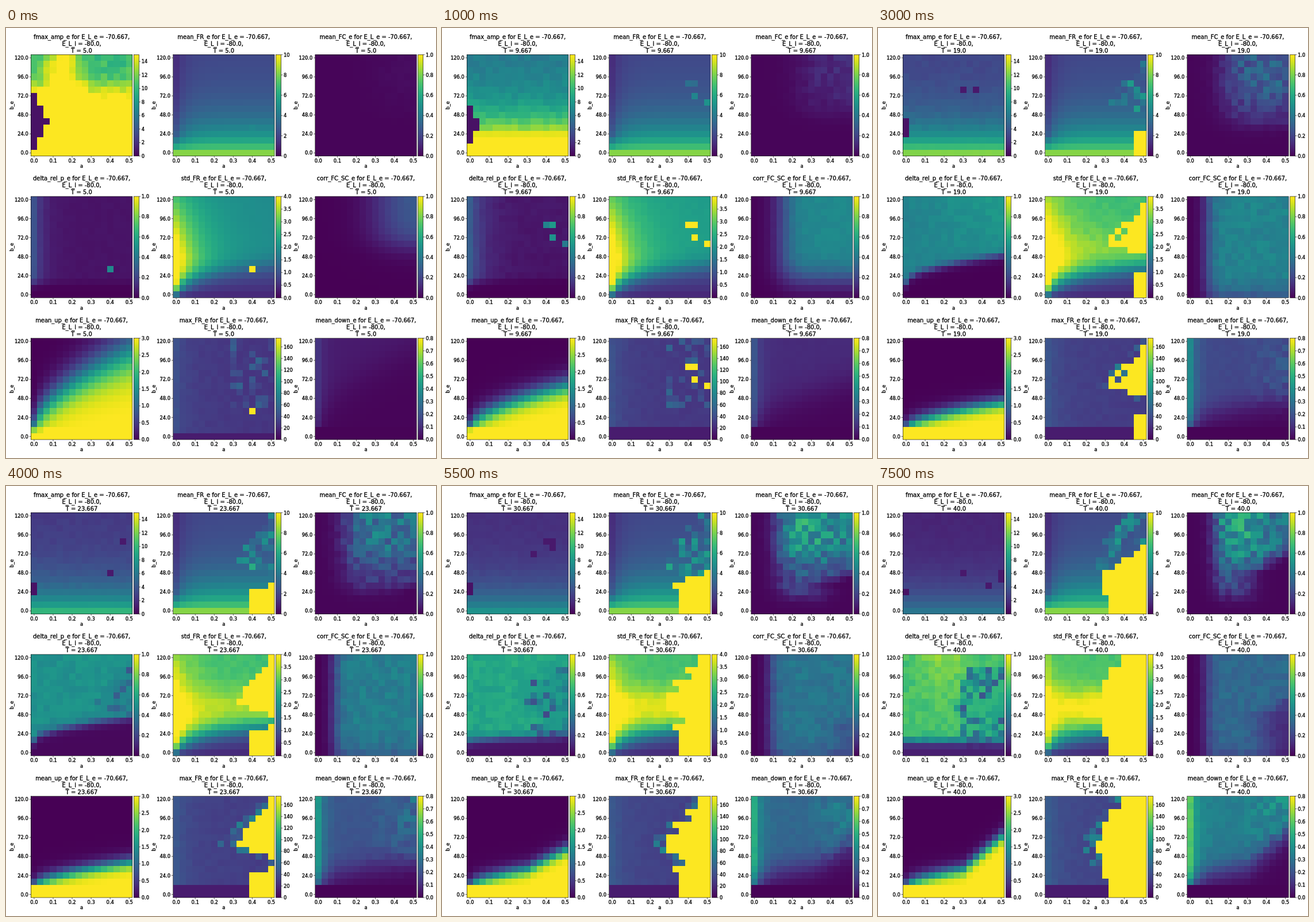
Write an HTML page that moves like this. It is 748 by 748 pixels and loops after 8000 ms.

```html
<!DOCTYPE html>
<html lang="en">
<head>
<meta charset="utf-8">
<title>Parameter sweep</title>
<style>
html, body { margin: 0; width: 100%; height: 100%; overflow: hidden; background: #fff; }
svg { display: block; width: 100vw; height: 100vh; }
text { font-family: "DejaVu Sans", Verdana, sans-serif; font-size: 8.3px; stroke: #000; stroke-width: .34px; }
.title { font-size: 9.95px; }
.cells { shape-rendering: crispEdges; }
.line { fill: none; stroke: #000; stroke-width: .6; }
</style>
</head>
<body>
<svg id="stage" viewBox="0 0 748 748"></svg>
<script>
const N = 16, STEPS = 16, STEP_MS = 500, SIZE = 176.4, CELL = SIZE / N;
const stage = document.getElementById("stage");
let step = 0;

const clamp = (v, lo, hi) => Math.min(hi, Math.max(lo, v));
const sig = x => 1 / (1 + Math.exp(-x));
const decay = (x, len) => Math.exp(-x / len);
const bell = x => Math.exp(-x * x);

// Linear change from a to b between two steps, held outside them
const go = (a, b, from = 0, to = STEPS - 1) => a + (b - a) * clamp((step - from) / (to - from), 0, 1);

const temp = () => 5 + step * 7 / 3;

function rnd(i, j, seed) {
  const s = Math.sin(i * 12.9898 + j * 78.233 + seed * 37.719) * 43758.5453;
  return s - Math.floor(s);
}

// First column of a row where the mean rate saturates
function meanEdge(j) {
  if (j < go(4, 3, 13, 15)) return Math.round(go(go(20, 11, 0, 9), 10, 13, 15));
  const rise = Math.max(0, j - go(go(3, 3.7, 6, 9), 6, 9, 15));
  return Math.ceil(go(go(20, 10.5, 0, 9), 9, 9, 13) + rise * go(8, 1.5, 6, 13));
}

// First column of a row where the peak rate saturates: a wedge pointing left
function peakEdge(j) {
  const tip = go(16, 9.5, 4, 6) - go(0, 2.5, 6, 15);
  const slope = j > 8 ? go(.95, .7, 6, 15) : go(3, .9, 6, 12);
  return Math.min(meanEdge(j), tip + slope * Math.abs(j - 8));
}

// Early isolated bursts, later everything inside the ragged wedge
function burst(i, j) {
  const r = rnd(i, j, step + 5);
  if (step < 5 && i > 11 && Math.abs(j - go(6, 11, 0, 4)) < 3 && r > go(.92, .75, 0, 4)) return true;
  return i >= meanEdge(j) || i + (j > 4 ? (r - .5) * 1.6 : 0) >= peakEdge(j);
}

// Row where the up state ends, for a column
const upEdge = i => 1.3 + (3.6 + 8.3 * decay(step, 2)) * (i / 15) ** .6
  + go(0, 4.2, 9, 13) * Math.max(0, i - 9) / 6;

function peakFreq(i, j, n) {
  const fade = decay(step, 4);
  if (Math.abs(j - 3.2 - 1.8 * fade) < .5 + 4.3 * fade - 2.2 * i) return .7;
  if (step > 3 && i > 8 && j > 3 && j < 12 && n > .94) return 1;
  const v = (56 + 176 * decay(j, 4) + (n - .5) * (j > 3 ? 9 : 2)) / temp();
  return v + go(1, 0, 0, 1) * (5 * bell((i - 4.5) / 3) - 2 * sig((j - 10.5) * 2));
}

function meanRate(i, j, n) {
  const edge = meanEdge(j);
  if (i >= edge) return 10;
  const v = (2 + 6.2 * decay(j, 4.3)) * (1 - .42 * decay(i, 1.6) * Math.min(1, j / 3));
  return v + (burst(i, j) ? n * n * 3 : 0);
}

function meanFC(i, j, n) {
  const rows = .4 * sig((j - go(6, 2.5, 3, 10)) / .6) + .6 * sig((j - go(8.5, 7.5)) / 1.2);
  const cols = sig((i - go(9, 4, 0, 9)) / go(1.5, .6)) * (1 - go(0, .3, 6, 13) * Math.max(0, i - 9) / 6);
  return .01 + go(.02, .52, 0, 11) * rows * cols * (.65 + .7 * n) * sig((meanEdge(j) - i + .5) / .8);
}

function deltaP(i, j, n) {
  if (step < 5 && burst(i, j)) return .4 + n * .15;
  const above = sig((j - 1.8 - 4.5 * bell((step - 6.5) / 3.5) * Math.sqrt(i / 15)) / .35);
  let v = go(.05, .44, 3.5, 6) + go(0, .18, 6, 15)
    + go(.2, .28, 0, 4) * go(1, 0, 4, 6) * decay(i, go(1.4, 3, 0, 4))
    + .13 * bell((step - 5) / 2) * i * j / 225
    + go(0, .13, 10, 15) * (j / 15) ** 2 * bell((i - 6) / 4)
    + (n - .5) * go(.01, .09, 0, 12);
  if (step > 6 && j < 14 && burst(i, j)) v -= n * n * go(.2, .5, 6, 13);
  return go(0, .08, 6, 15) + v * above;
}

function stdRate(i, j, n) {
  if (burst(i, j)) return 4;
  const low = .45 + .1 * j + decay(i, 1.2) * Math.min(1, j);
  const high = go(1.9, 2.75, 0, 6) + go(0, .1, 6, 15)
    + go(0, 1.1, 3, 13) * bell((j - 7) / 3.2) * (.8 + .05 * i)
    + go(2.6, 1) * decay(i, go(4, 1.3, 4, 15)) * (1 - Math.max(0, j - 6) * .07)
    + (n - .5) * go(.02, .18, 0, 6);
  return low + (high - low) * sig((j - .9 - go(4, 2.8) * Math.sqrt(i / 15)) / .85);
}

function corrFC(i, j, n) {
  const v = (go(.3, .47, 0, 2) - go(0, .13, 4, 15))
    * sig((i - 2.6 - 7.4 * decay(step, 1.5)) / (.6 + 1.4 * decay(step, 2)))
    * sig((j + 1.5 - 9.5 * decay(step, 2.4)) / 1.2);
  const shade = go(0, .65, 9, 13) * sig((i - meanEdge(j) - 2.3) / 1.1);
  return v * (1 + (n - .5) * go(.03, .22, 0, 8)) * (1 - shade);
}

function meanUp(i, j) {
  if (j === 0) return 3;
  const width = (.6 + .8 * decay(step, 2)) * (1 + i / 15 * .7 * decay(step, 1));
  const v = 3.05 * sig((upEdge(i) - j) / width);
  return j === 1 ? Math.max(v, 2.5 + .3 * i + .15 * step) : v;
}

function maxRate(i, j, n) {
  if (burst(i, j)) return 175;
  if (j < Math.min(2, step + 1)) return 13;
  let v = go(29, 37) - i * .15 + 13 * decay(i, 2) + (n - .5) * 4;
  if (j > 4 && step > 5 && i >= peakEdge(j) - 2) v += n * n * 45;
  if (step < 5 && i > 8 && j > 4) v += n ** 4 * 30;
  return v;
}

function meanDown(i, j, n) {
  if (j < 2) return .005;
  const above = sig((j - upEdge(i) - Math.min(1, i / 3) * .8) / go(1.8, 1.2, 0, 4));
  const v = go(.05, .33) + (go(.06, .2, 0, 5) + go(0, .05, 5, 15)) * decay(i, 1)
    + Math.max(0, i - 8) / 7 * n * go(0, .15, 2, 9) + (n - .5) * go(0, .04);
  return .008 + v * above;
}

const panels = [
  { name: "fmax_amp_e", max: 15, tick: 2, dec: 0, value: peakFreq },
  { name: "mean_FR_e", max: 10, tick: 2, dec: 0, value: meanRate },
  { name: "mean_FC_e", max: 1, tick: .2, dec: 1, value: meanFC },
  { name: "delta_rel_p_e", max: 1, tick: .2, dec: 1, value: deltaP },
  { name: "std_FR_e", max: 4, tick: .5, dec: 1, value: stdRate },
  { name: "corr_FC_SC_e", max: 1, tick: .2, dec: 1, value: corrFC },
  { name: "mean_up_e", max: 3, tick: .5, dec: 1, value: meanUp },
  { name: "max_FR_e", max: 175, tick: 20, dec: 0, value: maxRate },
  { name: "mean_down_e", max: .8, tick: .1, dec: 1, value: meanDown }
];

// Polynomial fit of the dark violet to yellow ramp, one row per channel
const ramp = [
  [.27773, .10509, -.33086, -4.63423, 6.22827, 4.77638, -5.43546],
  [.00541, 1.40461, .21485, -5.7991, 14.17993, -13.74515, 4.64585],
  [.3341, 1.38459, .0951, -19.33244, 56.69055, -65.35303, 26.31244]
];
function color(t) {
  const x = clamp(t, 0, 1);
  const rgb = ramp.map(c => clamp(Math.round(255 * c.reduceRight((s, v) => s * x + v, 0)), 0, 255));
  return `rgb(${rgb})`;
}

function add(parent, tag, attrs, text) {
  const el = document.createElementNS("http://www.w3.org/2000/svg", tag);
  for (const name in attrs) el.setAttribute(name, attrs[name]);
  if (text !== undefined) el.textContent = text;
  parent.appendChild(el);
  return el;
}

function label(x, y, text, anchor = "middle", cls = "") {
  return add(stage, "text", { x, y, "text-anchor": anchor, class: cls }, text);
}

const line = (x, y, dx, dy) => add(stage, "path", { class: "line", d: `M${x} ${y}l${dx} ${dy}` });

const grad = add(add(stage, "defs", {}), "linearGradient", { id: "ramp", x1: 0, y1: 1, x2: 0, y2: 0 });
for (let s = 0; s <= 32; s++) add(grad, "stop", { offset: s / 32, "stop-color": color(s / 32) });

function build(panel, index) {
  const x = 43.4 + 247.2 * (index % 3), y = 46.4 + 246.6 * Math.floor(index / 3);
  const mid = x + SIZE / 2, bottom = y + SIZE, bar = x + 179, barWidth = 8.9;

  label(mid, y - 27.6, panel.name + " for E_L_e = -70.667,", "middle", "title");
  label(mid, y - 15.8, "E_L_i = -80.0,", "middle", "title");
  panel.time = label(mid, y - 3.9, "", "middle", "title");

  const group = add(stage, "g", { class: "cells" });
  panel.cells = [];
  for (let j = 0; j < N; j++) for (let i = 0; i < N; i++) {
    panel.cells.push(add(group, "rect", {
      x: x + i * CELL, y: bottom - (j + 1) * CELL, width: CELL, height: CELL
    }));
  }
  add(stage, "rect", { class: "line", x, y, width: SIZE, height: SIZE });

  for (let n = 0; n < 6; n++) {
    const pos = (3 * n + .5) * CELL;
    line(x + pos, bottom, 0, 2.8);
    label(x + pos, bottom + 10.8, (n / 10).toFixed(1));
    line(x, bottom - pos, -2.8, 0);
    label(x - 4.6, bottom - pos + 3.1, (24 * n).toFixed(1), "end");
  }
  label(mid, bottom + 20.4, "a");
  const side = label(0, 0, "b_e");
  side.setAttribute("transform", `translate(${x - 30.5} ${y + SIZE / 2}) rotate(-90)`);

  add(stage, "rect", { x: bar, y, width: barWidth, height: SIZE, fill: "url(#ramp)" });
  add(stage, "rect", { class: "line", x: bar, y, width: barWidth, height: SIZE });
  for (let v = 0; v <= panel.max + 1e-6; v += panel.tick) {
    const ty = bottom - v / panel.max * SIZE;
    line(bar + barWidth, ty, 2.8, 0);
    label(bar + 13.4, ty + 3.1, v.toFixed(panel.dec), "start");
  }
}

function render() {
  const time = "T = " + temp().toFixed(step % 3 ? 3 : 1);
  panels.forEach((panel, p) => {
    panel.time.textContent = time;
    panel.cells.forEach((cell, c) => {
      const i = c % N, j = Math.floor(c / N);
      cell.setAttribute("fill", color(panel.value(i, j, rnd(i, j, p * 17 + step)) / panel.max));
    });
  });
}

function tick() {
  const next = Math.floor((performance.now() - start) / STEP_MS) % STEPS;
  if (next !== step) {
    step = next;
    render();
  }
  requestAnimationFrame(tick);
}

panels.forEach(build);
render();
const start = performance.now();
tick();
</script>
</body>
</html>
```
